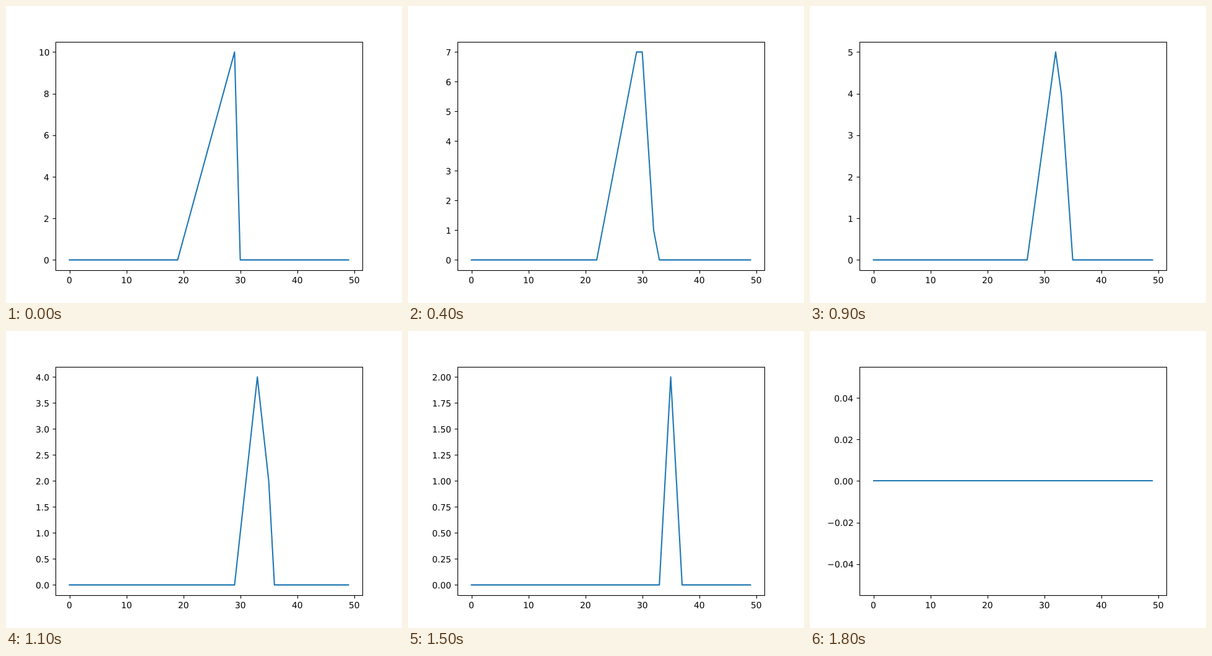
Recreate the animation shown at these times as an HTML page. Size 640 by 480 pixels, loop 2600 ms.

```html
<!DOCTYPE html>
<html lang="en">
<head>
<meta charset="utf-8">
<title>Advected ramp</title>
<style>
  html, body { margin: 0; width: 100%; height: 100%; overflow: hidden; background: #fff; }
  svg { display: block; width: 640px; height: 480px; }
  text { font: 13.889px "DejaVu Sans", sans-serif; fill: #000; text-rendering: geometricPrecision; }
  .axis { fill: none; stroke: #000; stroke-width: 1.111; }
  .curve { fill: none; stroke: #1f77b4; stroke-width: 2.083; stroke-linecap: square; stroke-linejoin: round; }
</style>
</head>
<body>
<svg id="plot" viewBox="0 0 640 480"></svg>
<script>
const LOOP = 2600, STEP = 100, CELLS = 50;
const LEFT = 80, RIGHT = 576, TOP = 57.6, BOTTOM = 427.2;
const PAD_X = (RIGHT - LEFT) / 22, PAD_Y = (BOTTOM - TOP) / 22;
const LABEL_GAP = 9.72;
const plot = document.getElementById('plot');

function add(parent, tag, attrs) {
  const el = document.createElementNS('http://www.w3.org/2000/svg', tag);
  for (const key in attrs) el.setAttribute(key, attrs[key]);
  return parent.appendChild(el);
}

// share: part of the text that lies left of x
function label(parent, str, x, y, share) {
  const el = add(parent, 'text', { y: Math.round(y) });
  el.textContent = str;
  el.setAttribute('x', Math.round(x - el.getComputedTextLength() * share));
}

const snap = v => Math.round(v) + 0.5;
const scaleX = i => LEFT + PAD_X + i / (CELLS - 1) * (RIGHT - LEFT - 2 * PAD_X);

// Upwind advection at half a cell per step, cut to whole numbers
const states = [Array.from({ length: CELLS }, (_, i) => i > 19 && i < 30 ? i - 19 : 0)];
while (Math.max(...states[states.length - 1]) > 0) {
  const u = states[states.length - 1];
  states.push(u.map((v, i) => i ? Math.floor((v + u[i - 1]) / 2) : v));
}

// Smallest round step giving at most nine intervals
function tickStep(span) {
  const raw = span / 9, unit = 10 ** Math.floor(Math.log10(raw));
  return unit * [1, 2, 2.5, 5, 10].find(m => m * unit >= raw);
}

function drawState(u) {
  const top = Math.max(...u), flat = top === 0;
  const lo = flat ? -0.05 : 0, hi = flat ? 0.05 : top;
  const scaleY = v => BOTTOM - PAD_Y - (v - lo) / (hi - lo) * (BOTTOM - TOP - 2 * PAD_Y);
  const step = tickStep((hi - lo) * 1.1);
  const digits = [0, 1, 2].find(d => Math.abs(step - step.toFixed(d)) < 1e-9);

  yAxis.replaceChildren();
  for (let k = Math.ceil(lo / step); k * step <= hi + 1e-9; k++) {
    const y = scaleY(k * step);
    add(yAxis, 'path', { class: 'axis', d: `M${LEFT + 0.5} ${snap(y)}h-5` });
    label(yAxis, (k * step).toFixed(digits).replace('-', '\u2212'), LEFT - LABEL_GAP, y + 5.5, 1);
  }

  const points = flat
    ? [0, CELLS - 1].map(i => [Math.round(scaleX(i)), Math.round(scaleY(0))])
    : u.map((v, i) => [scaleX(i), scaleY(v)]);
  curve.setAttribute('points', points.join(' '));
}

const curve = add(plot, 'polyline', { class: 'curve' });
add(plot, 'rect', {
  class: 'axis', x: snap(LEFT), y: snap(TOP),
  width: RIGHT - LEFT, height: Math.round(BOTTOM) - Math.round(TOP)
});
for (let v = 0; v <= 50; v += 10) {
  const x = scaleX(v);
  add(plot, 'path', { class: 'axis', d: `M${snap(x)} ${snap(BOTTOM)}v5` });
  label(plot, v, x, BOTTOM + LABEL_GAP + 11, 0.5);
}
const yAxis = add(plot, 'g', {});

const start = performance.now();
let shown = -1;
function tick() {
  const t = (performance.now() - start) % LOOP;
  // The first state holds for two steps, the last one to the end of the loop
  const n = Math.min(states.length - 1, Math.max(0, Math.floor(t / STEP) - 1));
  if (n !== shown) drawState(states[shown = n]);
  requestAnimationFrame(tick);
}
tick();
</script>
</body>
</html>
```
